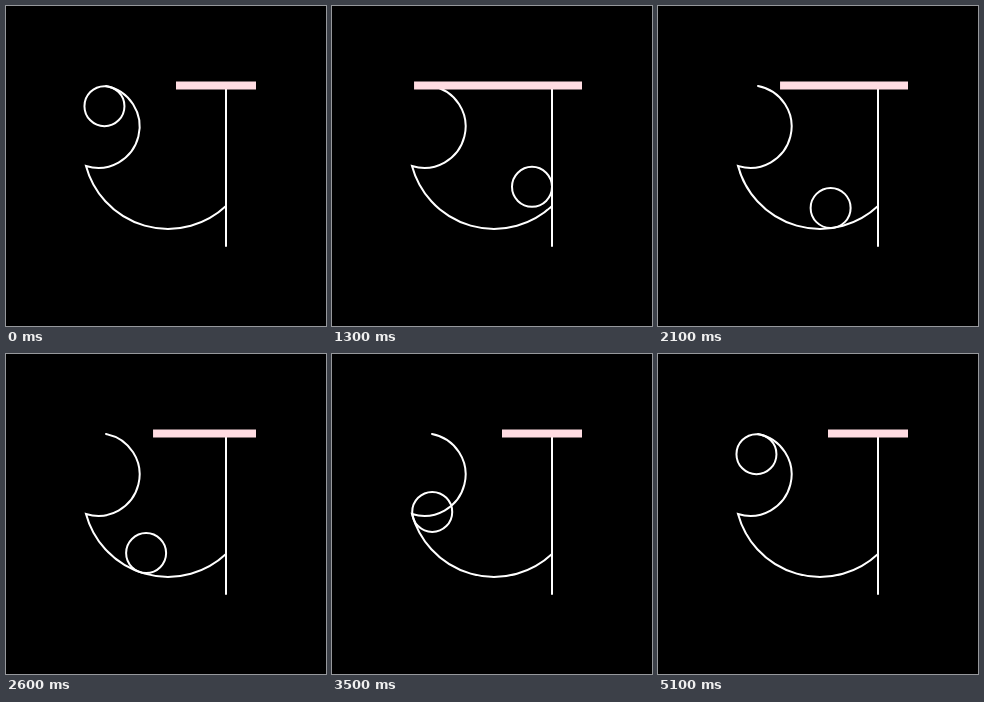
An HTML page that plays this animation: 320 px wide and 320 px high, repeating every 6000 ms.

```html
<!DOCTYPE html>
<html>
<head>
<meta charset="utf-8">
<style>
  html, body { margin: 0; width: 100%; height: 100%; overflow: hidden; background: #000; }
  svg { display: block; width: 100%; height: 100%; }
</style>
</head>
<body>
<svg viewBox="0 0 320 320" fill="none" stroke="#fff" stroke-width="2" stroke-linecap="round">
  <path d="M220 80V240M220 200A84.9 84.9 0 0 1 80 160A41.3 41.3 0 1 0 100 80"/>
  <circle id="ball"/>
  <rect id="bar" y="75.5" height="8" fill="#ffdce2" stroke="none"/>
</svg>
<script>
const LOOP = 6000, START = 60, LANDED = 800, RETURN = 1060;
const STEM = 40, TRACK = 345.4;
const bowl = { x: 162, y: 138, r: 84.9, from: Math.atan2(62, 58), to: Math.atan2(22, -82) };
const hook = { x: 92.4, y: 120.6, r: 41.3, from: Math.atan2(39.4, -12.4) };
const bowlLength = bowl.r * (bowl.to - bowl.from);

const ball = document.getElementById('ball');
const bar = document.getElementById('bar');
const progress = (t, from, to) => Math.min(1, Math.max(0, (t - from) / (to - from)));
const smooth = u => u * u * (3 - 2 * u);

// Centre of a ball of radius r touching the inside of an arc at the given angle
const inside = (arc, angle, r) => [
  arc.x + (arc.r - r) * Math.cos(angle),
  arc.y + (arc.r - r) * Math.sin(angle)
];

// The track runs down the stem, along the bowl, then up the hook
function centre(s, r) {
  if (s < STEM) return [220 - r, 160 + s];
  s -= STEM;
  if (s < bowlLength) return inside(bowl, bowl.from + s / bowl.r, r);
  return inside(hook, hook.from - (s - bowlLength) / hook.r, r);
}

function draw(t) {
  const out = progress(t, START, LANDED) ** 3;
  const back = progress(t, RETURN, RETURN + 4000);
  const settle = progress(t, LANDED, RETURN);
  const r = 20 + 3.5 * out * (1 - settle);
  const [x, y] = centre(TRACK * (1 - out + back), r);
  ball.setAttribute('cx', x);
  ball.setAttribute('cy', y);
  ball.setAttribute('r', r);

  const left = 170 - 100 * smooth(progress(t, START, 760))
    + 100 * progress(t, RETURN, RETURN + 2000);
  bar.setAttribute('x', left);
  bar.setAttribute('width', 250 - left);
}

const began = performance.now();
function frame() {
  draw((performance.now() - began) % LOOP);
  requestAnimationFrame(frame);
}
frame();
</script>
</body>
</html>
```
